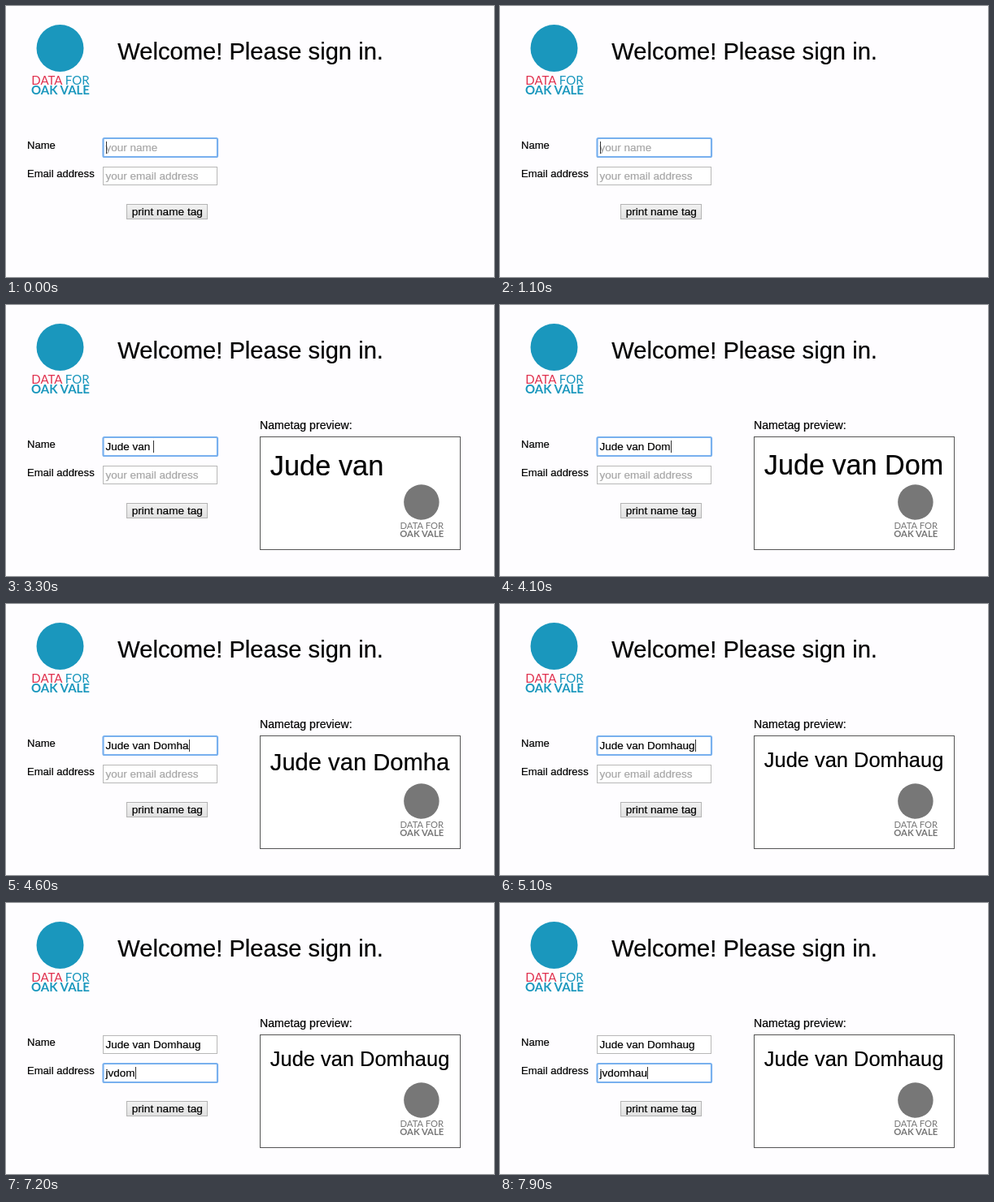
Write an HTML page that moves like this. It is 600 by 334 pixels and loops after 8 s.

```html
<!DOCTYPE html>
<html lang="en">
<head>
<meta charset="utf-8">
<title>Sign in</title>
<style>
  html, body { margin: 0; width: 100%; height: 100%; overflow: hidden; background: #fefdff; }
  svg { display: block; font: 13.5px "Liberation Sans", Arial, sans-serif; }
  text { white-space: pre; stroke: #000; stroke-width: .2; }
  .box { fill: #fff; stroke: #b8b8b8; }
  .ring { fill: none; stroke: #78b0ee; stroke-width: 2.2; }
  .hint { fill: #a6a6a6; stroke: #a6a6a6; }
  .brand { font: 15px Lato, sans-serif; text-anchor: middle; }
  .brand text { stroke: none; }
  .brand .bold { font-weight: 700; }
</style>
</head>
<body>
<svg width="600" height="334" viewBox="0 0 600 334">
  <defs>
    <linearGradient id="face" x2="0" y2="1">
      <stop stop-color="#f2f2f2"/><stop offset="1" stop-color="#e0e0e0"/>
    </linearGradient>
  </defs>

  <g class="brand" fill="#1a97bd">
    <circle cx="66.5" cy="52" r="29"/>
    <text x="67" y="96.5"><tspan fill="#e0324f">DATA</tspan> FOR</text>
    <text class="bold" x="67" y="109">OAK VALE</text>
  </g>
  <text x="137.3" y="66" font-size="29.15">Welcome! Please sign in.</text>

  <text x="26" y="176" font-size="13.05">Name</text>
  <text x="26" y="211" font-size="13.05">Email address</text>
  <rect class="box" x="119.5" y="163.5" width="140" height="22"/>
  <rect class="box" x="119.5" y="198.5" width="140" height="22"/>
  <rect class="ring" id="ring" x="119.5" width="140.5" height="23" rx="1.5"/>
  <text id="name" x="122.5" y="179"></text>
  <text id="email" x="122.5" y="214"></text>
  <rect id="caret" width="1" height="15" fill="#333"/>

  <rect x="148.5" y="244.5" width="99" height="18" fill="url(#face)" stroke="#b4b4b4"/>
  <text x="198.3" y="258" font-size="13.65" text-anchor="middle">print name tag</text>

  <g id="preview">
    <text x="312" y="153.4" font-size="14.1">Nametag preview:</text>
    <rect x="312.5" y="162.5" width="246" height="139" fill="#fff" stroke="#555"/>
    <text id="tag" x="324.8"></text>
    <g class="brand" fill="#777" transform="translate(461 204) scale(.75)">
      <circle cx="66.5" cy="52" r="29"/>
      <text x="67" y="96.5">DATA FOR</text>
      <text class="bold" x="67" y="109">OAK VALE</text>
    </g>
  </g>
</svg>
<script>
const LOOP = 8000, FOCUS_EMAIL = 5700, BLINK = 500;
const TAG_SIZE = 34.4, TAG_WIDTH = 220.5;

const $ = id => document.getElementById(id);
const fields = {
  name: {
    text: 'Jude van Domhaug', hint: 'your name',
    keys: [1200, 1500, 1700, 2000, 2200, 2600, 2800, 3000, 3200, 3500, 3800, 4000, 4300, 4600, 4800, 5000]
  },
  email: {
    text: 'jvdomhau', hint: 'your email address',
    keys: [6000, 6300, 6700, 6900, 7100, 7400, 7600, 7800]
  }
};

const typed = ({ text, keys }, t) => text.slice(0, keys.filter(k => k <= t).length);

function fill(id, t) {
  const field = fields[id], value = typed(field, t), el = $(id);
  el.textContent = value || field.hint;
  el.setAttribute('class', value ? '' : 'hint');
  return value;
}

function placeCaret(t, values) {
  const onEmail = t >= FOCUS_EMAIL, id = onEmail ? 'email' : 'name';
  const start = onEmail ? FOCUS_EMAIL : 0;
  const last = Math.max(start, ...fields[id].keys.filter(k => k <= t));
  const width = values[id] ? $(id).getComputedTextLength() : 0;
  $('caret').setAttribute('x', Math.round(122.5 + width));
  $('caret').setAttribute('y', onEmail ? 202 : 167);
  $('caret').style.visibility = Math.floor((t - last) / BLINK) % 2 ? 'hidden' : 'visible';
  $('ring').setAttribute('y', onEmail ? 198 : 163);
}

// The tag text shrinks once it is wider than the card.
function fitTag(name) {
  const tag = $('tag');
  tag.textContent = name.trim();
  tag.style.fontSize = TAG_SIZE + 'px';
  const size = TAG_SIZE * Math.min(1, TAG_WIDTH / (tag.getComputedTextLength() || 1));
  tag.style.fontSize = size + 'px';
  tag.setAttribute('y', 178.6 + 0.9 * size);
  $('preview').style.visibility = name ? 'visible' : 'hidden';
}

function draw() {
  const t = performance.now() % LOOP;
  const values = { name: fill('name', t), email: fill('email', t) };
  placeCaret(t, values);
  fitTag(values.name);
  requestAnimationFrame(draw);
}
draw();
</script>
</body>
</html>
```
